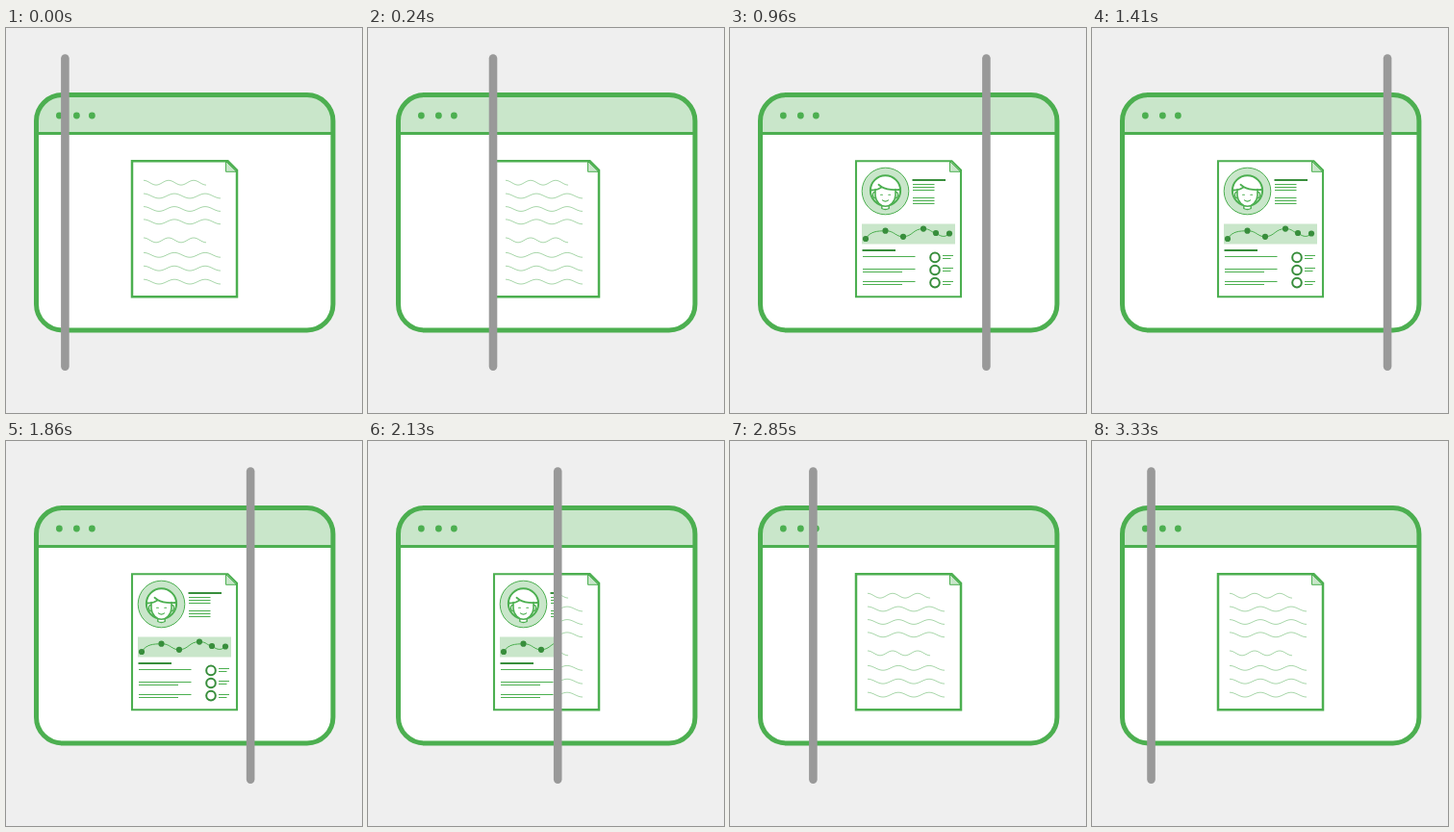
Write an HTML page that moves like this. It is 370 px wide and 400 px high and loops after 3.36 s.

```html
<!DOCTYPE html>
<html lang="en">
<head>
<meta charset="utf-8">
<title>Wipe from draft to profile</title>
<style>
  html, body { margin: 0; width: 100%; height: 100%; overflow: hidden; background: #efefef; }
  svg { display: block; width: 370px; height: 400px; }
  .line { fill: none; stroke: #4caf50; }
  .dark { fill: none; stroke: #388e3c; stroke-width: 2; }
  .soft { fill: #c9e6ca; }
  .wave { fill: none; stroke: #a9d7ab; stroke-width: 1; }
</style>
</head>
<body>
<svg viewBox="0 0 370 400">
  <defs>
    <clipPath id="leftClip"><rect id="leftRect" width="0" height="400"/></clipPath>
    <clipPath id="rightClip"><rect id="rightRect" width="370" height="400"/></clipPath>
    <clipPath id="windowClip"><rect x="31.5" y="69.5" width="308.4" height="244.5" rx="27"/></clipPath>
    <path id="sheet" d="M131 138.3H230.5L240 147.7V279.2H131Z"/>
    <path id="fold" d="M228.5 138.5V149.3H239.5Z"/>
  </defs>

  <g clip-path="url(#windowClip)">
    <rect width="370" height="400" fill="#fff"/>
    <rect class="soft" width="370" height="109"/>
  </g>
  <path class="line" stroke-width="3" d="M32 109.5H339"/>
  <rect class="line" stroke-width="5" x="31.5" y="69.5" width="308.4" height="244.5" rx="27"/>
  <g fill="#4caf50">
    <circle cx="55.4" cy="91" r="3.4"/>
    <circle cx="73.4" cy="91" r="3.4"/>
    <circle cx="89.4" cy="91" r="3.4"/>
  </g>

  <g clip-path="url(#rightClip)">
    <use href="#fold" class="soft" stroke="#4caf50"/>
    <use href="#sheet" class="line" stroke-width="2.5"/>
    <g id="draft"></g>
  </g>

  <g clip-path="url(#leftClip)">
    <use href="#fold" class="soft" stroke="#4caf50"/>
    <use href="#sheet" class="line" stroke-width="2.1"/>

    <circle cx="161.5" cy="169.5" r="24.3" class="soft" stroke="#4caf50"/>
    <g stroke="#4caf50" stroke-linecap="round" stroke-linejoin="round">
      <path fill="#fff" stroke-width="1.4" d="M157.8 184.5V187.5Q161.5 189.4 165.2 187.5V184.5Z"/>
      <circle cx="161.5" cy="168.9" r="15.6" fill="#fff" stroke-width="2"/>
      <path fill="#fff" stroke-width="1.4" d="M151 170.5C147.6 169.5 147.6 177.5 151.6 176.8M172 170.5C175.4 169.5 175.4 177.5 171.4 176.8"/>
      <path fill="#fff" stroke-width="1.6" d="M151 167.5V174C151.5 181 157 185.3 161.5 185.3S171.5 181 172 174V167.5"/>
      <path fill="none" stroke-width="1.8" d="M147 168.5Q155 168.3 157.5 165Q164 169 176 168M157.5 165L154.5 162.8"/>
      <path fill="none" stroke-width="1.1" d="M156.6 173.2H158.4M164.8 173.2H166.6M158.4 178.8Q161.5 181.4 164.6 178.8"/>
    </g>

    <rect class="soft" x="137" y="203.5" width="97" height="21"/>
    <path class="line" d="M141 219C146 211 153 211 161.5 210.7C171 210.5 172 217 180 216.8C190 216.6 190 208.6 201 208.6C209 208.6 209 212.7 214 213C220 217.5 224 217.5 228 213.5"/>
    <g id="points" fill="#388e3c"></g>

    <path class="dark" d="M137.5 231H172M189.5 158H224"/>
    <path class="line" d="M138 237.5H192.5M138 250.5H192.5M138 253.5H179M138 263.5H192.5M138 266.5H179"/>
    <path class="line" d="M190 162.5H212.5M190 165.5H212.5M190 168.5H212.5M190 176.5H212.5M190 179.5H212.5M190 182.5H212.5"/>
    <g class="dark">
      <circle cx="213" cy="238.4" r="4.8"/>
      <circle cx="213" cy="251.5" r="4.8"/>
      <circle cx="213" cy="264.6" r="4.8"/>
    </g>
    <path class="line" d="M221 236.5H232M221 239.5H229.5M221 249.5H232M221 252.5H229.5M221 263.5H232M221 266.5H229.5"/>
  </g>

  <rect id="bar" y="27.3" width="8.6" height="328.6" rx="4.3" fill="#999"/>
</svg>

<script>
const $ = id => document.getElementById(id);
const LOOP = 3360, STEP = 30, LEFT = 61.4, TRAVEL = 250.3;

// Each row runs from crest to trough over two and a half periods.
function wave(y, width) {
  let d = "";
  for (let x = 0; x <= width; x++) {
    const dy = -2.4 * Math.cos(x / width * 5 * Math.PI);
    d += `${x ? "L" : "M"}${143 + x} ${(y + dy).toFixed(2)}`;
  }
  return `<path class="wave" d="${d}"/>`;
}

$("draft").innerHTML =
  [160.7, 220.4].map(y => wave(y, 65)).join("") +
  [174.5, 188, 201.3, 235.8, 249.7, 263.6].map(y => wave(y, 80)).join("");

$("points").innerHTML =
  [[141, 219], [161.5, 210.7], [180, 216.8], [201, 208.6], [214, 213], [228, 213.5]]
    .map(([x, y]) => `<circle cx="${x}" cy="${y}" r="3.1"/>`).join("");

// Linear progress of each sweep: [ms, progress], with short pauses.
const OUT = [[0, 0], [480, .296], [540, .334], [960, .5746], [990, .5746],
  [1050, .631], [1620, 1], [1650, 1]];
const BACK = [[1650, 0], [1860, .1225], [1890, .1225], [2190, .2986], [2370, .403],
  [2730, .614], [2850, .684], [3270, .934], [LOOP, 1]];

function progress(keys, t) {
  const i = keys.findIndex(k => k[0] >= t);
  if (i < 1) return keys[0][1];
  const [t0, p0] = keys[i - 1], [t1, p1] = keys[i];
  return p0 + (p1 - p0) * (t - t0) / (t1 - t0);
}

const easeOut = u => 1 - (1 - u) ** 2;

function barX(t) {
  const k = t < 1650 ? easeOut(progress(OUT, t)) : 1 - easeOut(progress(BACK, t));
  return LEFT + TRAVEL * k;
}

function draw(ms) {
  const t = Math.floor((ms + 2) / STEP) * STEP % LOOP;
  const x = barX(t);
  $("bar").setAttribute("x", x - 4.3);
  $("leftRect").setAttribute("width", x);
  $("rightRect").setAttribute("x", x);
}

const start = performance.now();
function tick(now) {
  draw(Math.max(0, now - start));
  requestAnimationFrame(tick);
}
draw(0);
requestAnimationFrame(tick);
</script>
</body>
</html>
```
